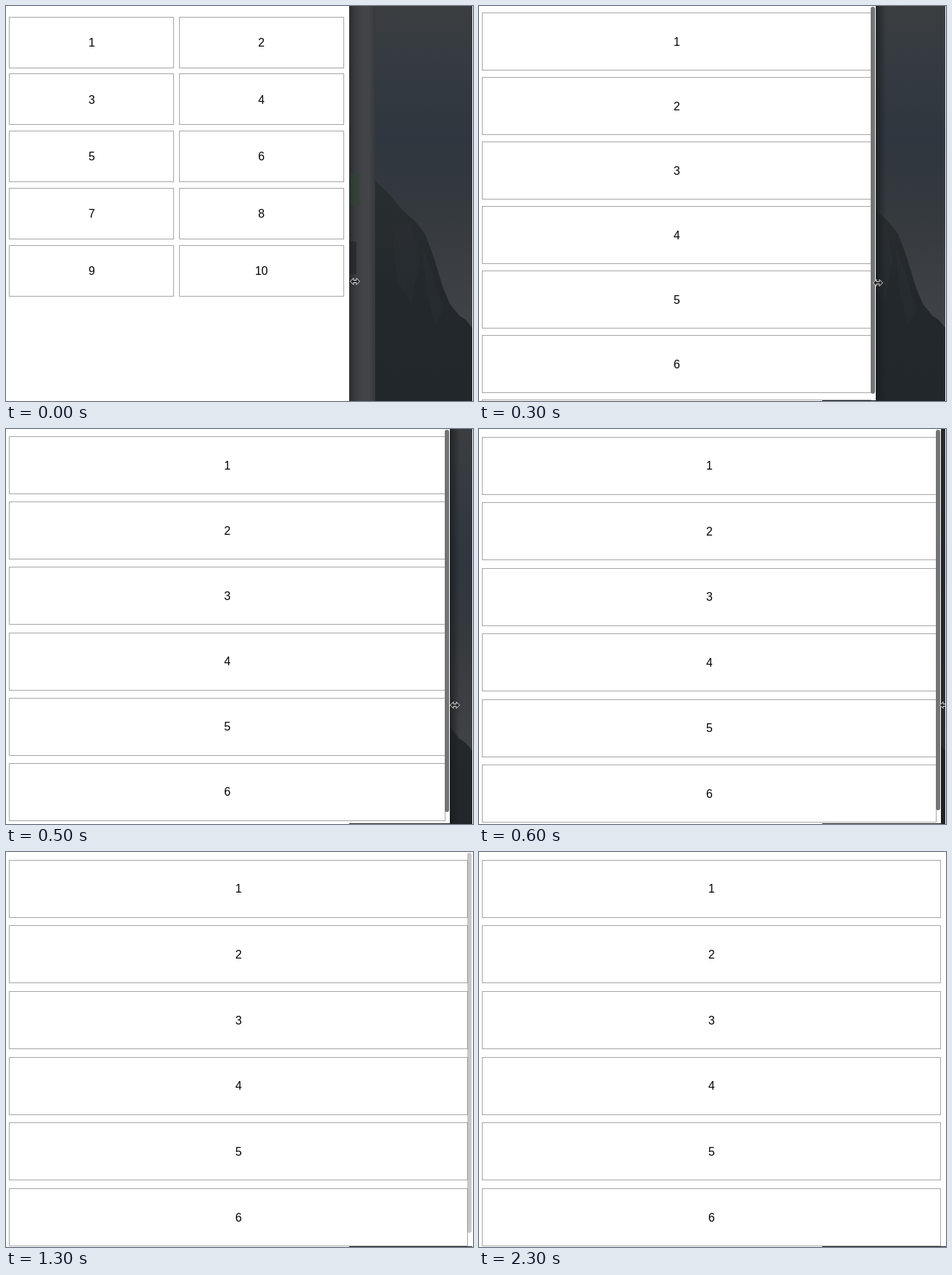
These frames come from a looping animation (645 px wide and 545 px high, 2400 ms). An HTML page with a canvas:

```html
<!DOCTYPE html>
<html lang="en">
<head>
<meta charset="utf-8">
<title>Responsive boxes</title>
<style>
  html, body { margin: 0; width: 100%; height: 100%; overflow: hidden; background: #fff; }
  canvas { display: block; }
</style>
</head>
<body>
<canvas id="stage" width="645" height="545"></canvas>
<script>
const W = 645, H = 545, EDGE = 644, LOOP = 2400, STEP = 100;
const ctx = document.getElementById('stage').getContext('2d');

// Window width and cursor position, one entry per step while dragging
const widths = [474, 510, 529, 548, 580, 613, 638, 644];
const cursors = [[482, 380], [514, 382], [533, 382], [551, 382], [586, 382], [620, 381], [643, 381], [645, 381]];

const ridge = [[474, 225], [510, 241], [527, 257], [548, 282], [566, 298], [579, 315], [591, 347],
  [603, 387], [613, 411], [626, 427], [635, 433], [644, 444]];

function rect(x, y, w, h, fill) {
  ctx.fillStyle = fill;
  ctx.fillRect(x, y, w, h);
}

function gradient(x0, y0, x1, y1, ...colors) {
  const g = ctx.createLinearGradient(x0, y0, x1, y1);
  colors.forEach((c, i) => g.addColorStop(i / (colors.length - 1), c));
  return g;
}

function polygon(points, fill) {
  ctx.beginPath();
  points.forEach(p => ctx.lineTo(...p));
  ctx.closePath();
  ctx.fillStyle = fill;
  ctx.fill();
}

function desktop(left, dragging) {
  rect(474, 0, 170, H, gradient(0, 0, 0, 460, '#3a3e41', '#343a40', '#30363f', '#34393e', '#3b3f43', '#414448'));
  polygon([...ridge, [644, H], [474, H]], gradient(0, 240, 0, H, '#292e31', '#23282c', '#22272b'));
  polygon([[532, 300], [562, 300], [572, 350], [560, 410], [540, 380]], 'rgba(50,54,57,.25)');
  polygon([[575, 330], [590, 370], [604, 420], [592, 440], [580, 390]], 'rgba(50,54,57,.25)');
  if (dragging) {
    rect(left, 0, 14, H, gradient(left, 0, left + 14, 0, 'rgba(24,28,31,.75)', 'rgba(24,28,31,0)'));
  } else {
    rect(474, 0, 36, H, gradient(474, 0, 510, 0, '#292d31', '#3a3d40', '#414447', '#434548', '#34383c'));
    rect(476, 232, 12, 44, 'rgba(45,68,49,.6)');
    rect(474, 325, 10, 45, 'rgba(30,35,40,.6)');
  }
}

function box(x, y, w, h, label) {
  ctx.strokeRect(Math.round(x) + .5, Math.round(y) + .5, Math.round(w), Math.round(h));
  ctx.fillText(label, x + w / 2 + .5, y + h / 2 + 6);
}

function boxes(width) {
  const two = width < 520;
  const w = two ? width * .479 : width - 11.5;
  const h = two ? 70.4 : 79.3;
  const pitch = h + width * .0176;
  const top = two ? 14.6 : width * .0165 + .2;
  ctx.strokeStyle = '#a6a6a6';
  ctx.lineWidth = 1;
  ctx.fillStyle = '#000';
  ctx.font = '16px "Liberation Sans", Arial, sans-serif';
  ctx.textAlign = 'center';
  for (let i = 0; i < 10; i++) {
    const x = two && i % 2 ? width - 8.2 - w : 4.4;
    box(x, top + pitch * (two ? i >> 1 : i), w, h, i + 1);
  }
}

function scrollbar(width, alpha) {
  ctx.globalAlpha = alpha;
  ctx.fillStyle = '#747474';
  ctx.beginPath();
  ctx.roundRect(width - 7, 1, 6, 534 - (width - 548) * .1, 3);
  ctx.fill();
  ctx.globalAlpha = 1;
}

function cursor(x, y) {
  const half = [[-6.5, 0], [-2, -4.5], [-2, -1.5], [2, -1.5], [2, -4.5], [6.5, 0]];
  const shape = [...half, ...half.slice(1, 5).reverse().map(([a, b]) => [a, -b])];
  polygon(shape.map(([a, b]) => [x + a, y + b]), '#202326');
  ctx.strokeStyle = '#e4e4e4';
  ctx.lineWidth = 1;
  ctx.stroke();
}

function draw(time) {
  const step = Math.floor(time % LOOP / STEP);
  const drag = Math.min(step, widths.length - 1);
  const width = widths[drag];
  rect(0, 0, W, H, '#fff');
  desktop(width, step > 0);
  rect(0, 0, width, H, '#fff');
  boxes(width);
  if (width > 520 && step < 15) scrollbar(width, Math.min(1, (15 - step) / 5));
  if (step <= 10) cursor(...cursors[drag]);
  rect(EDGE, 0, 1, H, '#fff');
  if (step > 0) rect(474, 544, step < 23 ? 170 : 171, 1, '#202428');
}

const start = performance.now();
function frame() {
  draw(performance.now() - start);
  requestAnimationFrame(frame);
}
frame();
</script>
</body>
</html>
```
